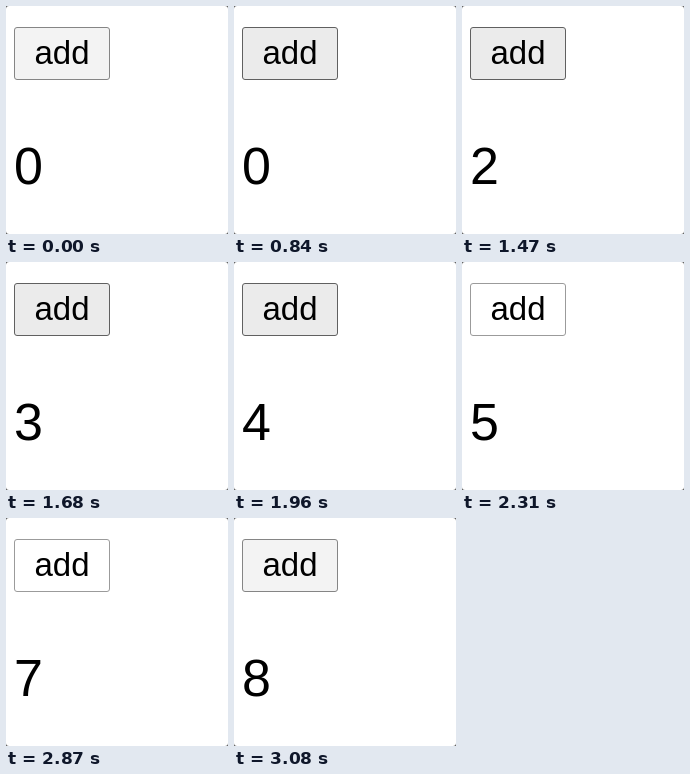
An HTML page for the animation above (3.78 s loop, 222 by 228 pixels).

```html
<!DOCTYPE html>
<html lang="en">
<head>
<meta charset="utf-8">
<title>Counter</title>
<style>
html, body { margin: 0; width: 100%; height: 100%; overflow: hidden; background: #555; }
svg { display: block; }
text { font-family: "Liberation Sans", Arial, sans-serif; fill: #000; }
.idle { fill: #f3f3f3; stroke: #858585; }
.hover { fill: #ebebeb; stroke: #606060; }
.active { fill: #fff; stroke: #9b9b9b; }
</style>
</head>
<body>
<svg width="222" height="228" viewBox="0 0 222 228">
  <rect width="222" height="228" rx="3" fill="#fff"/>
  <rect id="button" class="idle" x="8.5" y="21.5" width="95" height="52" rx="2.5"/>
  <text x="56" y="58" font-size="33" text-anchor="middle">add</text>
  <text id="count" x="8" y="178" font-size="52">0</text>
</svg>
<script>
const LOOP = 3780, ENTER = 840, LEAVE = 3080;
const presses = [1120, 1330, 1540, 1820, 2100, 2310, 2590, 2870];
const releases = [1260, 1470, 1680, 1960, 2170, 2450, 2730, 3010];
const button = document.getElementById("button");
const count = document.getElementById("count");
const passed = (times, t) => times.filter(time => time <= t).length;

function draw(now) {
  const t = now % LOOP;
  const clicks = passed(releases, t);
  const inside = t >= ENTER && t < LEAVE;
  const pressed = passed(presses, t) > clicks;
  button.setAttribute("class", pressed ? "active" : inside ? "hover" : "idle");
  count.textContent = clicks;
}

const start = performance.now();
function tick() {
  draw(performance.now() - start);
  requestAnimationFrame(tick);
}
tick();
</script>
</body>
</html>
```
